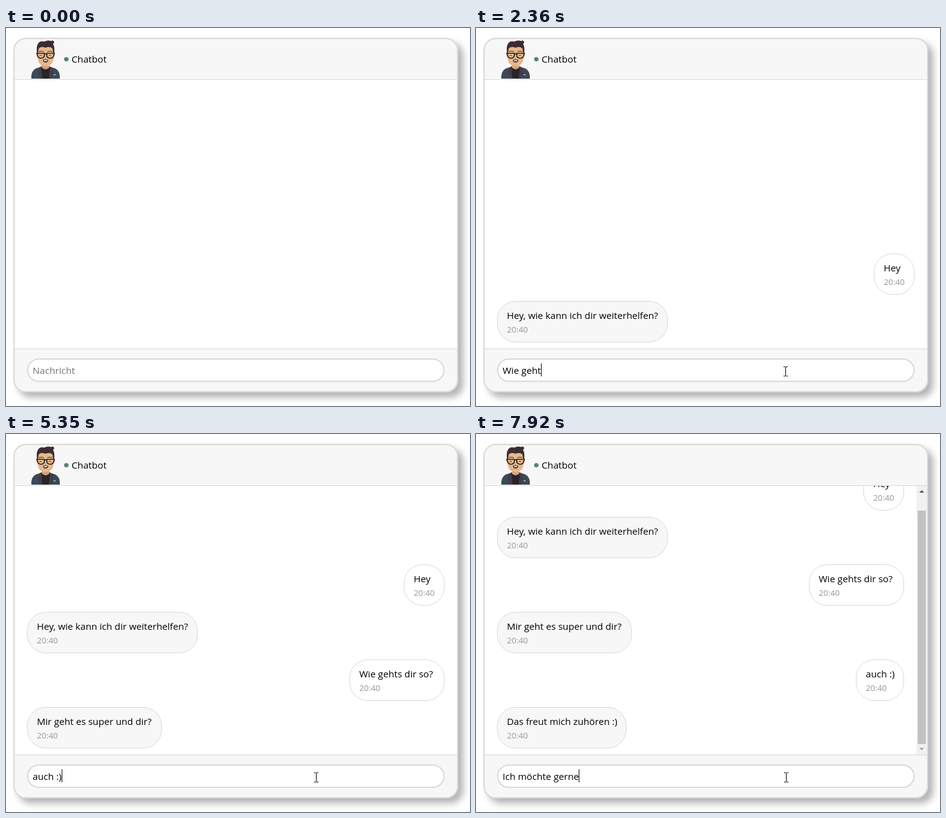
These frames come from a looping animation (750x612 px, 8 s). An HTML page with a canvas:

```html
<!DOCTYPE html>
<html lang="de">
<head>
<meta charset="utf-8">
<title>Chat</title>
<style>
  html, body { margin: 0; width: 100%; height: 100%; overflow: hidden; background: #fff; }
  canvas { display: block; width: 750px; height: 612px; }
</style>
</head>
<body>
<canvas id="stage" width="750" height="612"></canvas>
<script>
const LOOP = 8000;
const FONT = '15.2px "Open Sans", "Noto Sans", sans-serif';
const SMALL = '13.3px "Open Sans", "Noto Sans", sans-serif';
const LINE = '#d9d9d9', PANEL = '#f7f7f7';
const ctx = document.getElementById('stage').getContext('2d');

const messages = [
  { at: 870, text: 'Hey', width: 66, mine: true },
  { at: 1140, text: 'Hey, wie kann ich dir weiterhelfen?', width: 276 },
  { at: 3870, text: 'Wie gehts dir so?', width: 154, mine: true },
  { at: 4100, text: 'Mir geht es super und dir?', width: 218 },
  { at: 5620, text: 'auch :)', width: 78, mine: true },
  { at: 5850, text: 'Das freut mich zuhören :)', width: 209 }
];

// Input field timeline: text and caret state from a given time on.
const inputs = [];
const set = (at, text, caret) => inputs.push({ at, text, caret });
function type(from, to, before, added) {
  const gap = added.length > 1 ? (to - from) / (added.length - 1) : 0;
  for (let i = 0; i < added.length; i++) set(from + i * gap, before + added.slice(0, i + 1), true);
}
set(0, '', false);
set(140, '', true);
set(370, '', false);
type(473, 680, '', 'Hey');
set(870, '', true);
set(1140, '', false);
set(1410, '', true);
type(1600, 1600, '', 'W');
type(1790, 2130, 'W', 'ie geh');
type(2360, 2820, 'Wie geh', 'ts dir ');
set(2970, 'Wie gehts ', true);
type(3028, 3202, 'Wie gehts ', 'dir ');
type(3420, 3610, 'Wie gehts dir ', 'so?');
set(3870, '', true);
set(4100, '', false);
set(4370, '', true);
set(4640, '', false);
type(4692, 4900, '', 'auch ');
set(5170, 'auch ', false);
type(5200, 5200, 'auch ', ':');
type(5350, 5350, 'auch :', ')');
set(5620, '', true);
set(5850, '', false);
set(6120, '', true);
set(6390, '', false);
type(6650, 6910, '', 'Ich m');
type(7140, 7290, 'Ich m', 'öch');
type(7440, 7920, 'Ich möch', 'te gerne');

const pointer = [
  { at: 30, x: 521, y: 567 },
  { at: 67, x: 511, y: 562 },
  { at: 103, x: 503, y: 558 },
  { at: 140, x: 500, y: 556 },
  { at: 3260, x: 501, y: 556 }
];

const latest = (steps, t) => steps.filter(s => s.at <= t + 0.5).pop();

function rect(x, y, w, h, color) {
  ctx.fillStyle = color;
  ctx.fillRect(x, y, w, h);
}

function box(x, y, w, h, r, fill, border) {
  ctx.beginPath();
  ctx.roundRect(x + border / 2, y + border / 2, w - border, h - border, r - border / 2);
  ctx.fillStyle = fill;
  ctx.fill();
  ctx.strokeStyle = LINE;
  ctx.lineWidth = border;
  ctx.stroke();
}

function label(text, x, y, color = '#000', font = FONT) {
  ctx.font = font;
  ctx.fillStyle = color;
  ctx.fillText(text, x, y);
}

function path(d, fill, stroke, width = 1) {
  const p = new Path2D(d);
  if (fill) { ctx.fillStyle = fill; ctx.fill(p); }
  if (stroke) { ctx.strokeStyle = stroke; ctx.lineWidth = width; ctx.stroke(p); }
}

function drawAvatar() {
  path('M41 82V77Q42 66 53 64L58 62H70L75 64Q86 66 87 77V82Z', '#3b4a57');
  path('M55 64L58 62H70L73 64L71 82H57Z', '#282429');
  path('M54 64L57 63L59 82H56L51 73Z M74 64L71 63L69 82H72L77 73Z', '#453c4b');
  path('M58 57H70V64Q64 70 58 64Z', '#d6a277');
  path('M50 40H49Q48 44 51 47Z M78 40H79Q80 44 77 47Z', '#dfae80');
  path('M51 33Q64 26 77 33V48Q76 61 64 62Q52 61 51 48Z', '#e6b88a');
  path('M50 41Q49 30 51 27Q54 20 62 22Q67 19 73 21Q77 19 78 23Q77 25 76 26Q79 29 78 41H76.5L75 33Q70 29 64 32Q57 29 53 33L51.5 41Z', '#3c2c30');
  path('M53 38.5Q57 36.5 61 38.5M67 38.5Q71 36.5 75 38.5', null, '#4a3430', 1.2);
  path('M50 41H62V45Q61 49 56 49Q51 48 51 44ZM66 41H78L77 45Q76 49 71 49Q66 48 66 45ZM62 42.5Q64 41 66 42.5', null, '#22242a', 1.7);
  path('M54 45Q56 43.5 58 45M69 45Q71 43.5 73 45', null, '#55443e');
  path('M63 49Q64 50.5 65 49', null, '#b98259');
  path('M59.5 51.5Q64 50 68.5 51.5Q68 56 64 56Q60 56 59.5 51.5Z', '#5b3932');
  path('M61 52H67L66 53.5H62Z', '#fff');
  path('M76 76L80 74.5L79.5 76.5Z', '#dce5e8');
}

function drawFrame() {
  ctx.save();
  ctx.shadowColor = 'rgba(0,0,0,.3)';
  ctx.shadowBlur = 12;
  ctx.shadowOffsetX = ctx.shadowOffsetY = 8;
  ctx.beginPath();
  ctx.roundRect(12, 16, 719, 574, 20);
  ctx.fillStyle = '#fff';
  ctx.fill();
  ctx.restore();
  box(12, 16, 719, 574, 20, PANEL, 2);
  rect(14, 83, 715, 437, LINE);
  rect(14, 84, 715, 435, '#fff');
  drawAvatar();
  ctx.beginPath();
  ctx.arc(97.5, 50.5, 3.6, 0, Math.PI * 2);
  ctx.fillStyle = '#55866c';
  ctx.fill();
  label('Chatbot', 106, 56);
}

function drawMessages(t) {
  const shown = messages.filter(m => m.at <= t);
  const scrolls = shown.length === messages.length;
  const right = scrolls ? 692 : 709;
  ctx.save();
  ctx.beginPath();
  ctx.rect(14, 84, 715, 435);
  ctx.clip();
  shown.forEach((m, i) => {
    const x = m.mine ? right - m.width : 34;
    const y = 442 - 77 * (shown.length - 1 - i);
    box(x, y, m.width, 67, 30, m.mine ? '#fff' : PANEL, 1);
    label(m.text, x + 16, y + 29);
    label('20:40', x + 16, y + 51, '#969696', SMALL);
  });
  ctx.restore();
  if (scrolls) {
    rect(712, 84, 17, 435, '#f1f1f1');
    rect(714, 124, 13, 378, '#c1c1c1');
    path('M716.5 95L720.5 91L724.5 95Z', '#505050');
    path('M716.5 508L720.5 512L724.5 508Z', '#a3a3a3');
  }
}

function drawInput(t) {
  box(34, 535, 675, 38, 19, '#fff', 2);
  const { text, caret } = latest(inputs, t);
  label(text || 'Nachricht', 43, 560, text ? '#000' : '#757575');
  if (text.startsWith('Wie gehts ')) {
    const start = Math.round(43 + ctx.measureText('Wie ').width);
    const end = 43 + ctx.measureText('Wie gehts').width;
    ctx.beginPath();
    for (let x = start, i = 0; x <= end; x += 2, i++) ctx.lineTo(x, i % 2 ? 562 : 564);
    ctx.strokeStyle = '#e8282c';
    ctx.lineWidth = 1;
    ctx.stroke();
  }
  if (caret) rect(Math.round(43 + ctx.measureText(text).width), 543, 1, 21, '#000');
}

function drawPointer(t) {
  const p = latest(pointer, t);
  if (!p) return;
  rect(p.x, p.y - 7, 1, 14, '#000');
  for (const y of [p.y - 8, p.y + 7]) {
    rect(p.x - 3, y, 3, 1, '#000');
    rect(p.x + 1, y, 3, 1, '#000');
  }
}

function draw(t) {
  rect(0, 0, 750, 612, '#fff');
  drawFrame();
  drawMessages(t);
  drawInput(t);
  drawPointer(t);
}

const begin = performance.now();
function tick() {
  draw((performance.now() - begin) % LOOP);
  requestAnimationFrame(tick);
}
tick();
</script>
</body>
</html>
```
